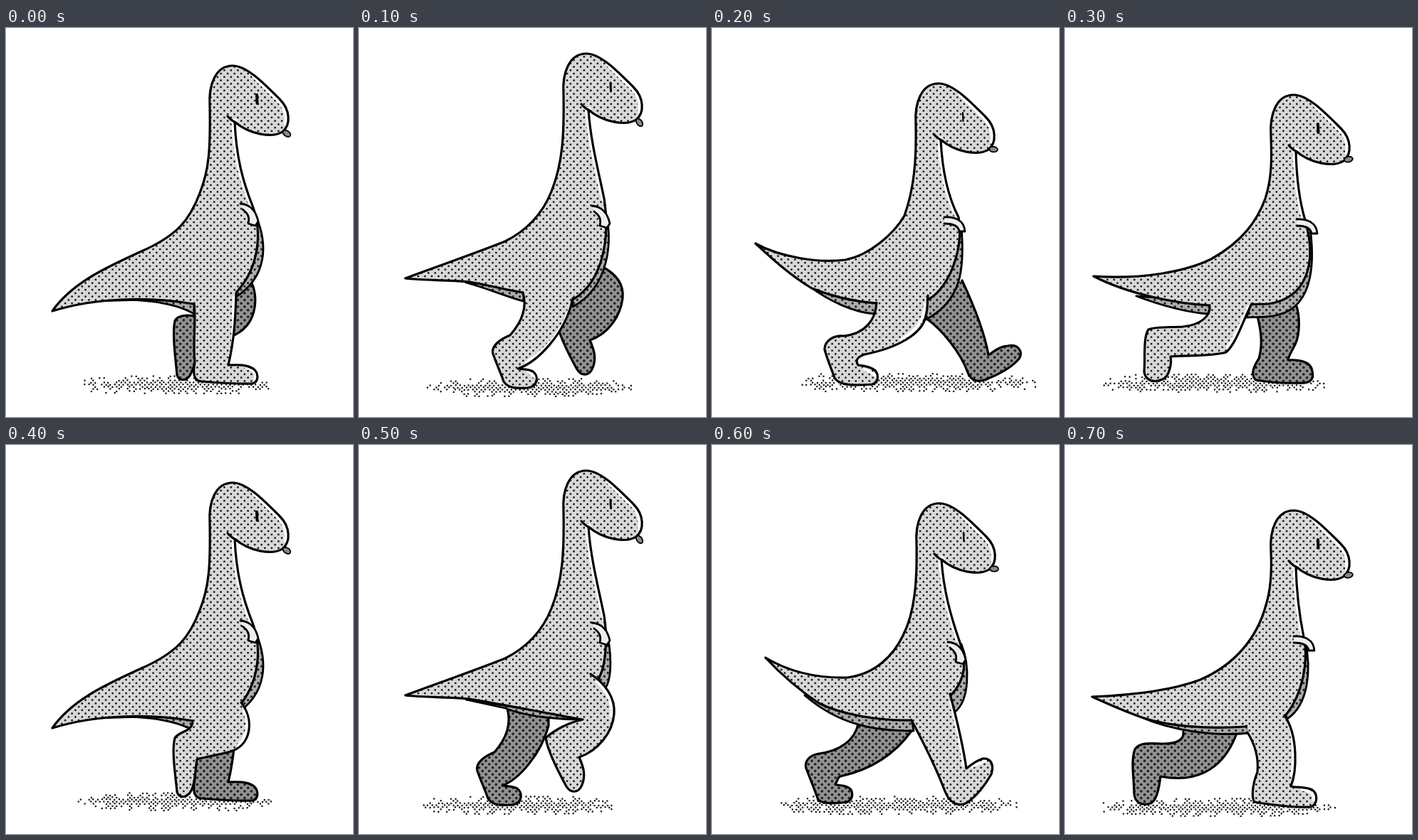
An HTML page with a canvas for the animation above (800 ms loop, 487 by 547 pixels).

```html
<!DOCTYPE html>
<html lang="en">
<head>
<meta charset="utf-8">
<title>Walking dinosaur</title>
<style>
html, body { margin: 0; width: 100%; height: 100%; overflow: hidden; background: #fff; }
canvas { display: block; }
</style>
</head>
<body>
<canvas id="stage" width="487" height="547"></canvas>
<script>
const ctx = document.getElementById("stage").getContext("2d");
const STEP = 100;

// Relative outline from the nape, over the head, to the throat
const HEAD = "c-2 -30 8 -57 32 -57c20 0 44 25 66 47c15 15 16 36 4 46c-14 9 -46 4 -67 -14";
const ARM_OUT = "c14 -1 28 4 29 20l-8 0c-1 -7 -7 -11 -21 -11";
const ARM_DOWN = "c13 1 22 10 25 25l-4 6l-10 -3c2 -9 0 -14 -8 -20";

const standing = "M264 387C267 410 262 440 265 470C261 490 266 497 275 497C300 499 325 501 346 500C356 497 354 484 347 479C335 472 322 474 312 474C320 440 322 410 323 373";
const tallBack = "M65 398C95 355 150 333 190 314C240 292 258 270 272 232C285 200 287 170 286 110";
const tallBelly = "C323 180 332 215 346 250C359 285 357 335 323 372L263 388C205 378 130 378 65 398Z";
const tallUnder = "M351 265C368 305 366 350 323 378L300 340ZM120 384C180 378 235 385 264 402L264 380Z";
const liftBack = "M65 352C110 335 160 318 205 300C245 280 262 250 270 230C286 190 288 150 287 93";

// back + HEAD + belly: body; under: far flank; near, far: [leg line, hip];
// lit: white edge; head: shift; ground: [left, right, middle]
const poses = [
  {
    back: tallBack, belly: tallBelly, under: tallUnder,
    near: [standing, "300 345L275 360"],
    far: ["M340 350C356 372 354 415 322 431L266 470L259 487C254 497 243 497 240 488C238 465 233 430 237 412C240 404 254 403 264 405", "300 370"],
    lit: "M320 378L318 440M335 476Q354 482 349 494",
    arm: "M329 247" + ARM_DOWN, head: [0, 0], eye: 4, ground: [103, 372, 501]
  },
  {
    back: liftBack,
    belly: "C325 160 337 205 344 240C352 290 345 355 300 382L230 372C200 367 180 361 155 357C120 354 90 355 65 352Z",
    under: "M345 255C358 300 350 365 300 392L300 370ZM150 358C180 366 205 377 230 384L235 365Z",
    near: ["M230 372C237 395 227 415 212 432C197 438 185 448 188 458C194 475 199 485 203 497C209 507 222 507 237 506C252 504 252 488 244 483C237 479 230 480 223 479C250 470 290 430 300 380", "290 350L245 355"],
    far: ["M340 335C360 345 372 360 370 380C367 405 350 430 324 439C331 455 333 465 328 478C323 490 312 490 306 480C295 460 280 430 277 412L292 388", "310 350"],
    lit: "M297 390Q282 440 235 470M236 482L248 492",
    arm: "M327 250" + ARM_DOWN, head: [1, -17], eye: 3, ground: [95, 385, 505]
  },
  {
    back: "M61 303C95 322 150 331 187 326C220 320 255 290 270 264C284 225 287 185 286 135",
    belly: "C323 200 330 235 346 266C354 305 335 365 303 382L231 387C190 384 160 374 140 366C110 348 85 325 61 303Z",
    under: "M350 280C355 340 350 385 298 411L300 380L340 300ZM135 362C165 385 200 400 228 402L235 385Z",
    near: ["M231 386C230 410 215 430 185 433C170 432 158 440 158 452C163 470 168 480 172 492C178 503 200 503 225 501C236 497 234 483 225 479C217 475 210 475 205 474C200 466 206 462 214 459C260 450 296 430 300 405C303 395 302 385 303 376", "290 345L245 362"],
    far: ["M351 355C365 385 382 425 388 460C395 455 405 447 415 447C430 444 437 455 431 465C420 478 400 488 385 494C370 500 362 494 358 482C350 460 325 425 300 408", "310 365"],
    lit: "M299 388Q298 420 265 438M213 479L229 488",
    arm: "M326 266" + ARM_OUT, head: [0, 25], eye: 2.2, ground: [110, 455, 498]
  },
  {
    back: "M40 349C110 354 170 342 205 325C250 300 270 270 281 240C291 210 290 180 289 151",
    belly: "C325 215 331 250 337 270C354 330 340 380 285 388L203 390C160 388 90 375 40 349Z",
    under: "M343 275C350 320 352 390 300 403C285 408 270 406 255 407L262 385ZM100 377C140 392 175 400 200 402L210 385Z",
    near: ["M203 390C205 405 190 418 165 420C145 421 125 420 117 424C109 435 113 470 111 483C113 497 125 499 137 494C147 490 150 470 148 462C175 460 205 462 226 456C240 445 250 410 262 388", "250 360L220 368"],
    far: ["M324 388C330 405 330 430 323 445C316 458 313 464 313 467C325 466 345 468 347 482C350 495 343 500 330 499C305 500 285 498 268 495C262 490 262 480 272 465C278 445 275 425 270 405", "290 385"],
    lit: "M257 392Q244 425 228 449",
    arm: "M325 269" + ARM_OUT, head: [3, 41], eye: 4, ground: [50, 365, 499]
  },
  {
    back: tallBack, belly: tallBelly, under: tallUnder,
    near: ["M330 362C348 385 345 420 318 430C300 436 280 438 268 442C265 460 266 475 260 486C254 497 243 497 240 488C238 465 232 430 237 412C242 402 262 404 262 388", "275 360L305 345"],
    far: [standing, "290 365"],
    lit: "M334 374Q346 400 326 422",
    arm: "M329 247" + ARM_DOWN, head: [0, 0], eye: 4, ground: [100, 372, 501]
  },
  {
    back: liftBack,
    belly: "C325 160 337 205 344 240C348 265 348 305 338 325L312 386C290 382 220 368 155 357C120 354 90 355 65 352Z",
    under: "M345 255C356 290 355 330 345 343L325 322ZM150 358C200 365 260 375 312 386C290 386 240 384 205 370Z",
    near: ["M325 322C345 335 360 355 358 378C356 405 335 430 309 439C316 455 318 465 313 478C308 490 297 490 291 480C280 460 265 430 262 412C275 400 295 390 314 386", "300 372L305 340"],
    far: ["M208 370C215 395 205 415 190 432C175 438 163 448 166 458C172 475 177 485 181 497C187 507 200 507 215 506C230 504 230 488 222 483C215 479 208 480 201 479C225 470 255 435 266 395L266 383", "240 370"],
    lit: "M334 333Q358 355 354 382",
    arm: "M327 250" + ARM_DOWN, head: [1, -17], eye: 3, ground: [83, 360, 506]
  },
  {
    back: "M75 299C110 320 150 328 190 327C230 322 255 295 268 268C285 235 288 190 287 139",
    belly: "C325 205 335 240 347 275C358 300 357 330 335 352L280 387C230 388 180 378 150 363C115 340 90 315 75 299Z",
    under: "M350 280C362 310 362 360 340 376L330 350ZM130 352C180 395 230 402 283 402L280 385Z",
    near: ["M280 387C295 415 315 455 327 487C335 507 350 510 362 500C375 490 385 475 392 463C396 450 392 440 380 441C370 444 363 450 357 455C352 420 342 380 334 350", "315 345L285 370"],
    far: ["M205 393C200 415 180 430 150 434C133 437 129 448 133 457C140 475 145 487 149 499C155 505 175 504 190 502C200 497 198 484 190 481C184 478 176 479 173 477C178 470 175 468 180 466C230 455 260 430 280 402", "240 390"],
    lit: "M335 362Q350 420 353 450M365 452L384 444",
    arm: "M331 277" + ARM_DOWN, head: [1, 29], eye: 2.4, ground: [93, 428, 506]
  },
  {
    back: "M38 354C90 352 150 345 190 330C240 308 270 270 282 225C290 200 290 170 289 149",
    belly: "C325 210 330 245 335 270C342 300 335 350 308 382L252 396C200 400 140 395 105 382C80 373 60 364 38 354Z",
    under: "M337 275C346 315 342 365 312 385L305 370ZM105 382C150 402 210 410 258 405L255 390Z",
    near: ["M256 404C266 420 272 440 270 460C262 480 262 497 266 502C290 506 320 510 345 509C355 505 355 490 347 485C338 480 325 482 317 480C325 460 328 410 308 380", "295 358L256 386"],
    far: ["M166 403C168 415 155 420 140 420C120 420 105 417 98 428C92 445 97 470 97 490C98 505 110 507 120 504C130 500 133 475 134 466C180 475 220 460 240 408", "200 400"],
    lit: "M314 392Q325 420 318 465M332 484Q352 488 349 500",
    arm: "M321 269" + ARM_OUT, head: [3, 39], eye: 4, ground: [53, 380, 509]
  }
];

// Halftone: two dots in each 9.5 px cell, drawn at double size
function halftone(base, ink, radius) {
  const cell = document.createElement("canvas");
  cell.width = cell.height = 19;
  const c = cell.getContext("2d");
  c.fillStyle = base;
  c.fillRect(0, 0, 19, 19);
  c.fillStyle = ink;
  for (const p of [4.75, 14.25]) {
    c.beginPath();
    c.arc(p, p, radius * 2, 0, 7);
    c.fill();
  }
  const pattern = ctx.createPattern(cell, "repeat");
  pattern.setTransform(new DOMMatrix().scale(0.5));
  return pattern;
}
const LIGHT = halftone("#d8d8d8", "#1c1c1c", 1.4);
const MID = halftone("#adadad", "#222", 1.6);
const DARK = halftone("#929292", "#222", 1.8);

function line(path, width = 3.2, color = "#000") {
  ctx.lineWidth = width;
  ctx.strokeStyle = color;
  ctx.stroke(new Path2D(path));
}

function fill(path, tone) {
  ctx.fillStyle = tone;
  ctx.fill(new Path2D(path));
}

function leg([path, hip], tone, lit) {
  fill(path + "L" + hip + "Z", tone);
  if (lit) line(lit, 4, "#fff");
  line(path);
}

function noise(n) {
  const v = Math.sin(n * 12.9898) * 43758.5453;
  return v - Math.floor(v);
}

// Stipple that thins out towards the rim
function ground([left, right, mid]) {
  ctx.fillStyle = "#111";
  const half = (right - left) / 2;
  for (let row = -4; row <= 4; row++) {
    for (let x = left + (row & 1) * 3; x < right; x += 6) {
      const far = Math.abs((x - left) / half - 1);
      const seed = x * 3.1 + row * 57.7;
      if (noise(seed) > 1.2 - far ** 3 * 0.7 - Math.abs(row) * 0.2) continue;
      ctx.fillRect(x + noise(seed + 1), mid + row * 3 - 1 + noise(seed + 2), 2.2, 2.2);
    }
  }
}

function face([dx, dy], eye) {
  ctx.save();
  ctx.translate(dx, dy);
  line("M311 124Q316 130 324 134");
  line("M352 94L352.5 106", eye);
  // The tongue hangs lower the higher the head is
  ctx.translate(389, 145);
  ctx.rotate(0.6 - dy * 0.02);
  ctx.beginPath();
  ctx.ellipse(6, 0, 6, 3.8, 0, 0, 7);
  ctx.fillStyle = "#888";
  ctx.fill();
  ctx.lineWidth = 1.8;
  ctx.stroke();
  ctx.restore();
}

function draw(p) {
  const [dx, dy] = p.head;
  const body = p.back + HEAD + p.belly;
  ctx.fillStyle = "#fff";
  ctx.fillRect(0, 0, 487, 547);
  ctx.lineCap = ctx.lineJoin = "round";
  ground(p.ground);
  leg(p.far, DARK);
  fill(p.under, MID);
  line(p.under, 2.8);

  fill(body, LIGHT);
  ctx.save();
  ctx.clip(new Path2D(body));
  line(`M${350 + dx} ${67 + dy}l34 33c10 10 13 22 11 34`, 10, "#fff");
  line(`M${321 + dx} ${132 + dy}` + p.belly.split("C").slice(0, 2).join("C"), 9, "#fff");
  ctx.restore();
  line(body);

  leg(p.near, LIGHT, p.lit);
  fill(p.arm, "#eee");
  line(p.arm, 2.8);
  face(p.head, p.eye);
}

let shown = -1;
function tick() {
  const i = Math.floor(performance.now() / STEP) % poses.length;
  if (i !== shown) draw(poses[shown = i]);
  requestAnimationFrame(tick);
}
tick();
</script>
</body>
</html>
```
